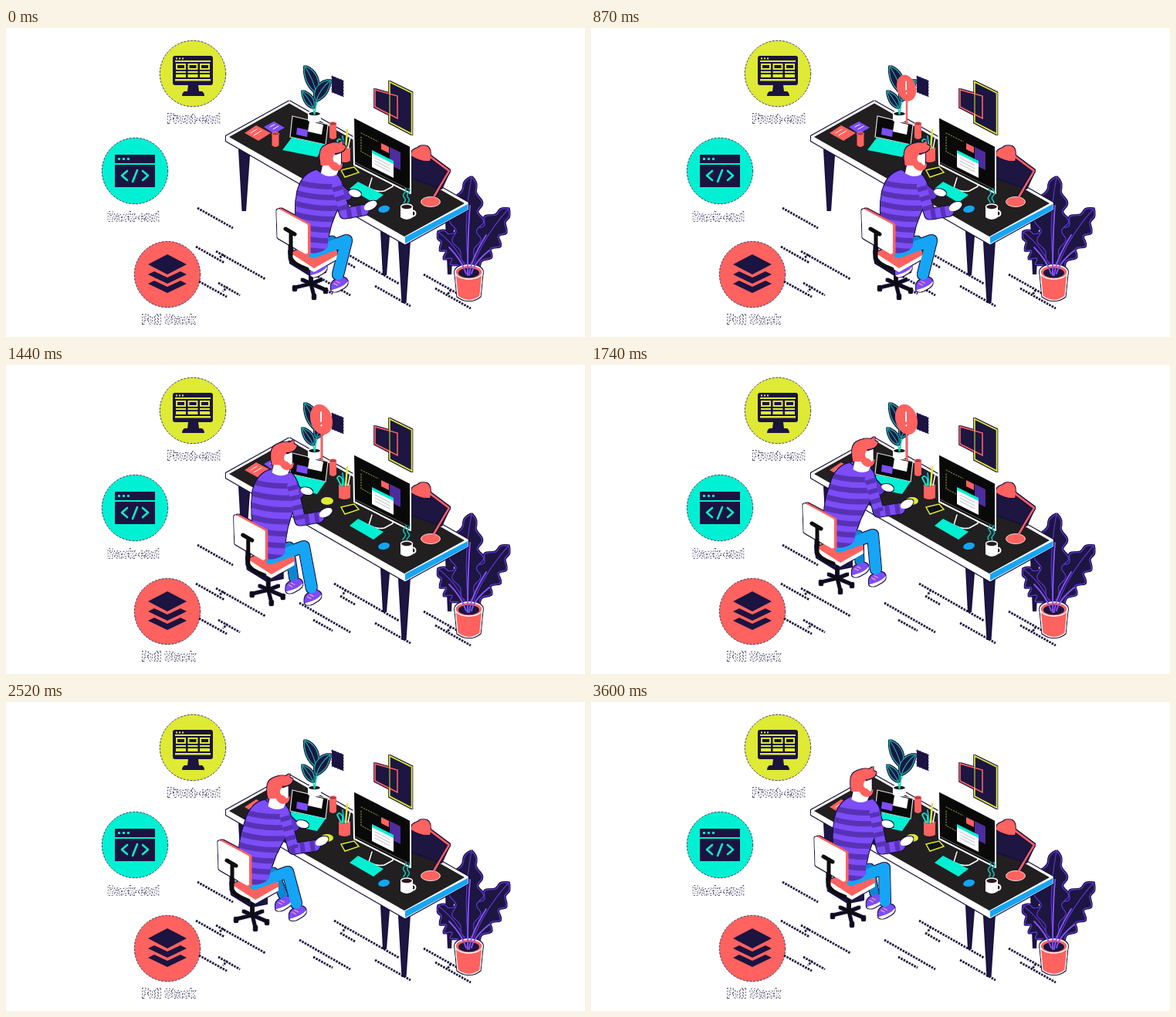
These frames come from a looping animation (750 by 400 pixels, 3.63 s). An HTML page:

```html
<!DOCTYPE html>
<html lang="en">
<head>
<meta charset="utf-8">
<title>Developer at a desk</title>
<style>
html, body { margin: 0; width: 100%; height: 100%; overflow: hidden; background: #fff; }
svg { display: block; width: 750px; height: 400px; }
text { font: 500 16px Roboto, Arial, sans-serif; fill: #fff; stroke: #1b1340; stroke-width: 1.3px; stroke-dasharray: 2 1.8; paint-order: stroke; text-anchor: middle; }
.line { fill: none; stroke-linecap: round; stroke-linejoin: round; }
.navy { fill: #1b1340; } .coral { fill: #ff625f; } .white { fill: #fff; }
.teal { fill: #00f0d3; } .black { fill: #090909; } .violet { fill: #7c4df8; }
.lime { fill: #deea33; } .blue { fill: #12a5f5; }
</style>
</head>
<body>
<svg viewBox="0 0 750 400">
<defs>
  <filter id="halo" x="-10%" y="-10%" width="120%" height="120%">
    <feMorphology in="SourceAlpha" operator="dilate" radius="1" result="grow"/>
    <feFlood flood-color="#170c42"/>
    <feComposite in2="grow" operator="in"/>
    <feMerge><feMergeNode/><feMergeNode in="SourceGraphic"/></feMerge>
  </filter>
  <clipPath id="torsoClip"><path id="torsoCut"/></clipPath>
</defs>

<g id="badges">
  <g stroke="#1b1340" stroke-width=".8" stroke-dasharray="3 1.5">
    <circle class="lime" cx="242" cy="59" r="42.7"/>
    <circle class="teal" cx="167" cy="185" r="42.7"/>
    <circle class="coral" cx="209" cy="319" r="42.7"/>
  </g>
  <path class="navy" d="M219 36H265Q268 36 268 39V71Q268 74 265 74H249L250 82H254Q257 84 257 88H228Q228 84 231 82H235L236 74H219Q216 74 216 71V39Q216 36 219 36Z"/>
  <path class="lime" d="M219 42H265V44H219ZM219 66H265V68.500H219Z"/>
  <g id="panels" class="lime"></g>
  <path class="navy" d="M141 164H193V175H141ZM141 177H193V206H141Z"/>
  <path class="teal" d="M145 168h3v3h-3zM151 168h3v3h-3zM157 168h3v3h-3z"/>
  <path class="line" stroke="#00f0d3" stroke-width="2.600" d="M157 185L150 191L157 197M177 185L184 191L177 197M170 184L164 199"/>
  <path class="navy" d="M209 293L234 306L209 319L184 306Z"/>
  <path id="layer" class="navy" d="M184 319L192 315L209 323L226 315L234 319L209 331Z"/>
  <use href="#layer" y="12"/>
  <text x="243" y="122.500">Front-end</text>
  <text x="165" y="249.500">Back-end</text>
  <text x="210.500" y="382.500">Full Stack</text>
</g>

<path class="line" stroke="#1b1340" stroke-width="2.800" style="stroke-linecap:butt" stroke-dasharray="2.600 1.300"
  d="M248 233l46 26M246 283l37 21M272 289l64 36M282 293l-6 5M250 328l36 20M275 330l28 16M287 335l-6 6M380 308l66 38M398 330l25 14M425 283l84 48M433 299l19 11M440 291l-4 7M478 334l46 26M541 319l46 26M556 337l46 26M576 339l-4 6"/>

<g id="wall">
  <path fill="#1b1340" stroke="#32208a" stroke-width="1" stroke-dasharray="2 2" d="M422 62L437 68V89L422 83Z"/>
  <g filter="url(#halo)">
    <path class="navy" stroke="#deea33" stroke-width="1.600" d="M497 70L525.500 84V137L497 122Z"/>
    <path class="navy" stroke="#ff625f" stroke-width="1.600" d="M478 80L507 88V117L478 102Z"/>
    <path class="line" stroke="#deea33" d="M497 86V113"/>
  </g>
</g>

<path class="navy" filter="url(#halo)" d="M302 156L315 164L310 236H306.500ZM509 276L523 274L517.500 355H513.500ZM570 248L580 241L576 318H573ZM486 262L496 268L492 319H489Z"/>

<g id="bigPlant">
  <g id="bigLeaves" fill="#1b1340" stroke="#5b35c9" stroke-width="1.300" filter="url(#halo)"></g>
  <g filter="url(#halo)">
    <path class="coral" stroke="#fff" stroke-width="1.200" d="M582 316L585 347Q600 358 614 347L617 316Z"/>
    <ellipse class="coral" cx="599.500" cy="316" rx="17.500" ry="9" stroke="#fff" stroke-width="1.500"/>
    <ellipse class="navy" cx="599.500" cy="317" rx="13.500" ry="6.500"/>
  </g>
  <path class="line" stroke="#8a55ff" stroke-width="1.800" d="M596 318Q590 300 574 284M598 320Q598 270 601 230M600 320Q602 300 622 268M603 318Q606 304 626 288"/>
</g>

<g id="desk">
  <g filter="url(#halo)">
    <path class="white" d="M367 94.500L598.500 226V235L517 280L285 146V140Z"/>
    <path class="blue" d="M517 270.500L598 228V235L517 279Z"/>
  </g>
  <path fill="#211f20" d="M367 97.500L594 227L516 270L289 141Z"/>
</g>

<g id="things">
  <path class="coral" d="M309 136L324 126L343 136L327 146Z"/>
  <path class="violet" d="M334 128L347 121L361 129L347 137Z"/>
  <path class="line" stroke="#fff" d="M317 136L325 131M321 139L331 133M342 128L348 125M346 131L353 127"/>

  <path class="black" stroke="#ddd" stroke-width="1.200" d="M371 114L417 125L414 151L368 141Z"/>
  <path class="violet" d="M377 129L391 132L390 141L376 138Z"/>
  <path class="white" d="M393 121L411 125L409 138L391 134Z"/>
  <path class="teal" d="M370 142L414 151L403 167L358 158Z"/>

  <path class="white" d="M391 111V120Q399 126 408 120V111Z"/>
  <ellipse cx="399.500" cy="111" rx="8" ry="3" fill="#111" stroke="#fff" stroke-width="1.500"/>
  <path class="line" stroke="#00d9bd" stroke-width="1.200" d="M400 112Q404 92 398 76M399 112Q401 96 412 80M399 111Q398 100 390 90"/>
  <g id="leaves" fill="#1b1340" stroke="#15b8b0" stroke-width="1.100" filter="url(#halo)"></g>

  <g id="cans"></g>
  <ellipse class="lime" cx="416" cy="176" rx="8" ry="5"/>
  <path fill="#111" stroke="#deea33" stroke-width="1.500" d="M434 184L451 180L457 187L439 193Z"/>
  <path class="line" stroke="#deea33" stroke-width="2.500" d="M442 132L440 156"/>
  <path class="line" stroke="#12a5f5" stroke-width="2" d="M436 140L438 156"/>
  <path class="line" stroke="#00f0d3" stroke-width="1.800" d="M434 156L429 146Q432 141 436 148L436 156"/>
  <path class="line" stroke="#fff" stroke-width="1.500" d="M446 141L443 156"/>

  <path class="navy" filter="url(#halo)" d="M525 163L548 164L575 184L564 208L525 194Z"/>
  <g filter="url(#halo)">
    <path class="line" stroke="#ff625f" stroke-width="2.200" d="M546 164L574 185L552 222"/>
    <path class="coral" d="M525 165Q525 157 534 155Q537 151 545 153Q552 157 549 172Q537 173 525 165Z"/>
  </g>
  <ellipse class="coral" cx="550" cy="225" rx="12.500" ry="6.500" stroke="#fff" stroke-width=".8"/>
  <path class="line" stroke="#ff625f" stroke-width="2.200" d="M560 209L552 223"/>

  <path class="line" stroke="#fff" stroke-width="1.500" d="M474 194L470 207Q480 213 490 211L501 205V202"/>
  <path class="black" stroke="#fff" stroke-width="2" stroke-linejoin="round" d="M450 115L524 153V214L451 177Z"/>
  <path class="line" stroke="#666" d="M452 174L522 209"/>
  <path class="line" stroke="#96a926" stroke-dasharray="1.500 2" d="M460 136L482 147M460 141V160L473 167"/>
  <path class="coral" d="M486 149L496 154V162L486 157Z"/>
  <path fill="#4d2c9c" d="M497 154L511 161V184L497 177Z"/>
  <path class="white" d="M474 159L502 173V194L474 180Z"/>
  <path class="teal" d="M474 158L502 172V176L474 162Z"/>
  <path class="line" stroke="#aab" stroke-width=".8" d="M478 168L497 178M478 172L497 182M478 176L497 186"/>

  <path class="teal" d="M445 208L456 199L489 216L476 226Z"/>
  <ellipse class="blue" cx="489.500" cy="234.500" rx="7.500" ry="4.500" transform="rotate(-12 489 234)"/>
  <circle cx="527" cy="240" r="3.500" fill="none" stroke="#fff" stroke-width="2"/>
  <path class="white" d="M511 231V245Q519 251 527 245V231Z"/>
  <ellipse cx="519" cy="231.500" rx="7.500" ry="3.500" fill="#2a1720" stroke="#fff" stroke-width="1.500"/>
  <path id="steam" class="line" stroke="#12b5b0" stroke-width="1.700"/>
</g>

<g id="alert">
  <g stroke="#2a0d25" fill="#2a0d25" stroke-width="2.500">
    <path d="M409 88V123"/>
    <ellipse id="disc" cx="408.500" cy="70.500" rx="13" ry="19" stroke="none" transform="rotate(-16 408.500 70.500)"/>
  </g>
  <g id="alertFace">
    <path class="line" stroke="#ff625f" stroke-width="2.500" d="M409 88V123"/>
    <ellipse class="coral" cx="408.500" cy="70.500" rx="14" ry="20" transform="rotate(-16 408.500 70.500)"/>
    <path class="line" stroke="#fff" stroke-width="2" d="M408 61V73M408.500 78V78.500"/>
  </g>
</g>
<g id="leafLines" fill="none" stroke="#15b8b0" stroke-width="1.100"></g>

<g id="man" filter="url(#halo)">
  <path id="armL" class="line" stroke="#6234c9" stroke-width="11"/>
  <ellipse id="handL" class="white" rx="8" ry="4.500"/>
  <g class="chair">
    <path class="navy" d="M366 288L394 310L414 306V316L394 320L368 304Z"/>
    <path class="line" stroke="#090909" stroke-width="4" d="M395 310V331"/>
    <path class="line" stroke="#090909" stroke-width="2.800" d="M395 331L374 336M395 331L399 347M395 331L414 339M395 331L384 326M395 331L408 326"/>
    <path class="line" stroke="#090909" stroke-width="4.500" d="M374 336v2M399 347v2M414 339v2"/>
  </g>
  <path id="legFar" class="line" stroke="#0f86d2" stroke-width="11"/>
  <g id="shoeFar" class="shoe"></g>
  <g class="chair">
    <path class="white" d="M368 292L428 288L429 299L399 316L369 300Z"/>
    <path class="coral" d="M368 291L398 279L429 289V294L399 311Z"/>
  </g>
  <g id="shoeNear" class="shoe"></g>
  <path id="legNear" class="line" stroke="#12a5f5" stroke-width="14"/>
  <path id="torso" class="violet"/>
  <g clip-path="url(#torsoClip)"><path id="stripes" class="line" stroke="#5833b5" stroke-width="7"/></g>
  <path id="armR" class="line" stroke="#7c4df8" stroke-width="13"/>
  <path id="bands" class="line" stroke="#5833b5" stroke-width="13" style="stroke-linecap:butt" stroke-dasharray="6 7"/>
  <ellipse id="handR" class="white" rx="9" ry="5"/>
  <g id="head">
    <path class="white" d="M-10 4L-14 22Q-4 29 6 24L12 10V-4Z"/>
    <path class="coral" d="M-14 12Q-18 -8 -10 -13Q0 -19 9 -17L14 -20L14 -15L18 -13Q17 -7 10 -5L4 -4V6L10 12L14 9Q14 18 6 19Q0 19 -4 12Z"/>
    <ellipse class="white" cx="5" cy="3" rx="3.500" ry="5"/>
  </g>
  <g class="chair" stroke-width="5" stroke-linejoin="round">
    <path class="coral" stroke="#ff625f" d="M356 236L392 255V291L356 271Z"/>
    <path class="white" stroke="#fff" d="M353 237L388.500 256V290L354 270Z"/>
    <path class="line" stroke="#090909" d="M362 260L374 267M369 266V297Q371 305 390 312"/>
  </g>
</g>
</svg>

<script>
const LOOP = 3630, TAU = Math.PI * 2;
const $ = id => document.getElementById(id);
const set = (id, name, value) => $(id).setAttribute(name, value);
const mix = (a, b, u) => a + (b - a) * u;
const ramp = (t, start, length) => Math.min(1, Math.max(0, (t - start) / length));
const ease = u => (1 - Math.cos(Math.PI * u)) / 2;
const wave = (t, turns) => Math.sin(t / LOOP * TAU * turns);

// Leaf around a quadratic spine; "lobe" scallops its edge.
function leaf(x0, y0, cx, cy, x1, y1, width, lobe = 0) {
  const left = [], right = [];
  for (let i = 0; i <= 40; i++) {
    const u = i / 40;
    const x = mix(mix(x0, cx, u), mix(cx, x1, u), u);
    const y = mix(mix(y0, cy, u), mix(cy, y1, u), u);
    const a = Math.atan2(mix(cy - y0, y1 - cy, u), mix(cx - x0, x1 - cx, u));
    const w = width * Math.pow(Math.sin(Math.PI * u), .7) * (1 + lobe * Math.sin(u * 28));
    const dx = Math.sin(a) * w, dy = -Math.cos(a) * w;
    left.push(`${(x + dx).toFixed(1)} ${(y + dy).toFixed(1)}`);
    right.unshift(`${(x - dx).toFixed(1)} ${(y - dy).toFixed(1)}`);
  }
  return `<path d="M${left.join('L')}L${right.join('L')}Z"/>` +
    `<path fill="none" d="M${x0} ${y0}Q${cx} ${cy} ${x1} ${y1}"/>`;
}

const can = (x, y, r, h) =>
  `<path class="coral" d="M${x - r} ${y}V${y + h}Q${x} ${y + h + 4} ${x + r} ${y + h}V${y}Z"/>` +
  `<ellipse cx="${x}" cy="${y}" rx="${r}" ry="2.300" fill="#b83a42" stroke="#ff8a80" stroke-width=".8"/>`;

function build() {
  $('bigLeaves').innerHTML =
    leaf(603, 313, 618, 270, 651, 234, 16, .28) +
    leaf(596, 314, 588, 286, 560, 264, 15, .28) +
    leaf(599, 308, 592, 250, 603, 193, 18, .24);
  $('leaves').innerHTML = $('leafLines').innerHTML =
    leaf(402, 84, 398, 66, 387, 50, 7) +
    leaf(402, 94, 406, 80, 420, 68, 7) +
    leaf(398, 103, 394, 94, 384, 82, 5);
  $('cans').innerHTML = can(349, 137, 4.5, 15) + can(423.5, 124, 4.5, 18) + can(438.5, 156, 7.5, 16);

  let panels = '';
  for (let i = 0; i < 3; i++) {
    const x = 220 + i * 15.5;
    panels += `<path d="M${x} 46h13v8h-13zM${x} 56h13v2h-13zM${x} 60h13v4h-13zM${220 + i * 4} 38.500h2v2h-2z"/>` +
      `<path class="navy" d="M${x + 2} 48h9v4h-9z"/>`;
  }
  $('panels').innerHTML = panels;

  for (const shoe of document.querySelectorAll('.shoe')) shoe.innerHTML = `<g transform="rotate(-27)">
    <path class="white" d="M-12 2Q-11 8 0 7Q12 7 12 1Z"/>
    <path class="violet" d="M-12 2Q-10 -6 -3 -7H6Q13 -5 12 2Q4 6 -12 2Z"/>
    <path class="line" stroke="#ff9a9a" stroke-width="1.300" d="M-5 -4L-2 0M-1 -5L2 -1"/></g>`;
}

function drawMan(t) {
  // The head leads the roll along the desk, the feet come last.
  const roll = lag => ease(ramp(t, 1000 + lag, 540));
  const scoot = ease(ramp(t, 2700, 540));
  const step = ease(ramp(t, 2300, 400));
  const tap = wave(t, 24);
  const sway = 2.5 * Math.cos(t / 1020 * TAU) * (1 - roll(0));

  const go = (x, y, dx, dy, u) => ({ x: x + dx * u, y: y + dy * u });
  const chair = go(15 * scoot, -5 * scoot, -76, -55, roll(90));
  const chest = go(sway * .2 + 6 * scoot, -5 * scoot, -67, -57, roll(35));
  const head = go(419.5 + sway - 2 * scoot, 166 - 9 * scoot, -66, -53, roll(0));
  const handR = go(472, 230 - tap * (1 - roll(0)), -63, -50, roll(0));
  const handL = go(452, 214 + tap, -68, -55, roll(0));
  const near = go(431 + 12 * step, 332 - 6 * step, -61, -55, roll(150));
  const far = go(404 + 19 * step, 313 - 7 * step, -56, -48, roll(150));
  handR.y += 28 * Math.sin(Math.PI * roll(0));  // pushes off the desk edge

  // k = 0 follows the chair, k = 1 follows the chest.
  const at = (x, y, k = 0) =>
    `${(x + mix(chair.x, chest.x, k)).toFixed(2)} ${(y + mix(chair.y, chest.y, k)).toFixed(2)}`;
  const place = (id, p, turn = 0) => set(id, 'transform', `translate(${p.x} ${p.y}) rotate(${turn})`);

  for (const part of document.querySelectorAll('.chair'))
    part.setAttribute('transform', `translate(${chair.x} ${chair.y})`);

  const body = `M${at(402, 184, 1)}Q${at(383, 188, 1)} ${at(377, 212, 1)}` +
    `Q${at(372, 236, .5)} ${at(378, 262)}L${at(390, 291)}Q${at(408, 294)} ${at(417, 283)}` +
    `Q${at(416, 255, .5)} ${at(436, 221, 1)}Q${at(439, 200, 1)} ${at(426, 188, 1)}Q${at(412, 193, 1)} ${at(402, 184, 1)}Z`;
  set('torso', 'd', body);
  set('torsoCut', 'd', body);
  let stripes = '';
  for (let i = 0; i < 7; i++) {
    const y = 200 + i * 14, k = 1 - i / 6;
    stripes += `M${at(368, y - 3, k)}Q${at(404, y + 10, k)} ${at(448, y + 3, k)}`;
  }
  set('stripes', 'd', stripes);

  const ax = 428 + chest.x, ay = 205 + chest.y, wx = handR.x - 9, wy = handR.y + 6;
  const arm = `M${ax} ${ay}L${mix(ax, wx, .3)} ${wy + 4}L${wx} ${wy}`;
  set('armR', 'd', arm);
  set('bands', 'd', arm);
  set('armL', 'd', `M${ax} ${ay}L${handL.x - 10} ${handL.y + 3}`);
  place('handR', handR, -28);
  place('handL', handL, 15);
  place('head', head);

  set('legNear', 'd', `M${at(398, 291)}L${at(441, 275)}L${near.x - 1} ${near.y - 13}`);
  set('legFar', 'd', `M${at(400, 284)}L${at(422, 275)}L${far.x} ${far.y - 11}`);
  place('shoeNear', near);
  place('shoeFar', far);
}

function drawAlert(t) {
  const u = ramp(t, 640, 380);
  const grow = ease(u) + .35 * Math.sin(Math.PI * u) * u;  // springs past full size
  const face = 1 - ramp(t, 1990, 200);
  const shown = u > 0 && t < 2230;
  set('alert', 'display', shown ? 'inline' : 'none');
  set('alert', 'transform', `translate(409 124) scale(${grow}) translate(-409 -124)`);
  set('alertFace', 'opacity', face);
  set('leafLines', 'opacity', shown ? 1 - face : 0);
}

function drawSteam(t) {
  let d = '';
  for (const x of [515.5, 520.5])
    for (let i = 0; i <= 12; i++) {
      const bend = 1.6 * Math.sin(i * .75 - t / LOOP * TAU * 3);
      d += `${i ? 'L' : 'M'}${(x + i * .1 + bend).toFixed(2)} ${226 - i * 1.5}`;
    }
  set('steam', 'd', d);
}

function draw() {
  const t = performance.now() % LOOP;
  drawMan(t);
  drawAlert(t);
  drawSteam(t);
  requestAnimationFrame(draw);
}
build();
draw();
</script>
</body>
</html>
```
